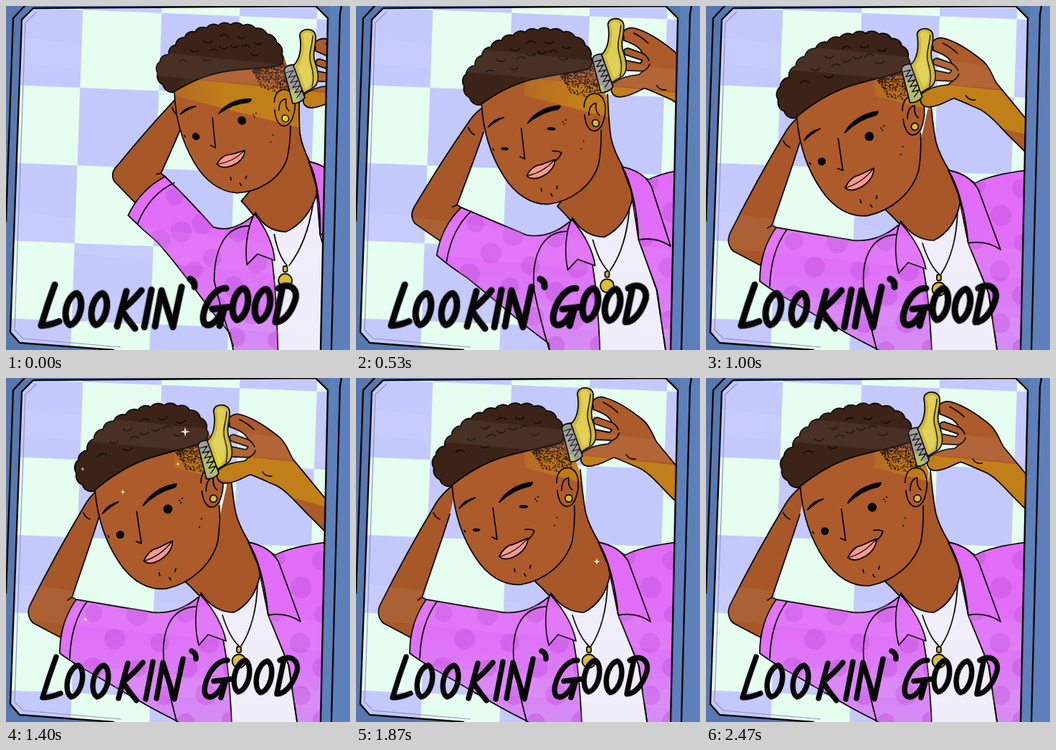
Recreate the animation shown at these times as an HTML page. Size 480x480 px, loop 2540 ms.

```html
<!DOCTYPE html>
<html lang="en">
<head>
<meta charset="utf-8">
<title>Lookin' Good</title>
<style>
html, body { margin: 0; width: 100%; height: 100%; overflow: hidden; background: #5b7db6; }
svg { display: block; width: 100vw; height: 100vh; }
.ink, .line { stroke: #0b0706; stroke-width: 1.8; stroke-linecap: round; stroke-linejoin: round; }
.ink { fill: none; }
.thin { stroke-width: 1.3; }
.skin { fill: #ad5b2a; }
.shade { fill: #a75728; }
.cloth { fill: url(#cloth); }
#sheen { mix-blend-mode: overlay; }
</style>
</head>
<body>
<svg viewBox="0 0 480 480" role="img" aria-label="Lookin' good">
  <defs>
    <linearGradient id="cloth" gradientUnits="userSpaceOnUse" x1="0" y1="230" x2="0" y2="480">
      <stop offset="0" stop-color="#e26cf8"/><stop offset=".5" stop-color="#e06ff7"/><stop offset="1" stop-color="#d58df5"/>
    </linearGradient>
    <linearGradient id="gold">
      <stop offset="0" stop-color="#bee614" stop-opacity=".2"/><stop offset=".3" stop-color="#bee614" stop-opacity=".5"/>
    </linearGradient>
    <clipPath id="glass"><path d="M38 3L432 0L449 17L439 480H150L19 470L6 455L22 19Z"/></clipPath>
    <clipPath id="shirtClip"><use href="#shirtL"/><use href="#shirtR"/></clipPath>
    <clipPath id="skinClip"><use href="#face" id="faceClip"/><use href="#neck"/><use href="#hand" id="handClip"/></clipPath>
  </defs>

  <g clip-path="url(#glass)">
    <rect width="480" height="480" fill="#e5feef"/>
    <path id="tiles" fill="#c4c9fd"/>

    <path class="warp shade line" d="M140 150L131 153Q120 162 112 174Q70 244 33 318Q28 332 38 342L76 362L98 309L92 306Q119 228 131 190"/>
    <path class="warp ink" d="M108 188Q111 195 117 197M92 306L86 310"/>
    <path id="neck" class="warp shade line" d="M313 128Q317 172 321 190Q326 208 339 229L357 258L356 302L318 334L288 326Q268 300 250 284L290 230"/>
    <path class="warp line" fill="#f0edfb" d="M272 300Q290 327 318 327Q348 312 355 272Q361 300 366 331L394 400L412 520L316 520L303 372Z"/>
    <path id="shirtL" class="warp cloth line" d="M98 309Q150 318 205 327Q240 330 268 306L303 365Q314 420 316 520L244 520L241 480Q205 462 185 450Q150 430 118 411Q95 399 75 384Q75 341 98 309Z"/>
    <path id="shirtR" class="warp cloth line" d="M338 229L376 247Q400 234 460 228L520 520L412 520L395 402L366 331L352 262Z"/>
    <g id="spots" fill="#c556e0" opacity=".5" clip-path="url(#shirtClip)"></g>
    <path class="warp ink" d="M266 319C228 320 215 356 221 402Q228 445 244 500M113 312C98 332 90 358 89 391"/>
    <path class="warp ink" d="M302 331Q312 362 325 374M351 287Q349 342 328 374"/>
    <path class="warp cloth line" d="M271 302C263 320 263 350 269 373L282 358L307 367C302 343 289 322 271 302Z"/>
    <path class="warp cloth line" d="M338 229Q368 235 380 256L411 340Q390 326 366 331C362 290 352 250 338 229Z"/>
    <g id="pendant" class="line" fill="#cfb52e">
      <rect x="-3" y="-20" width="6" height="8" rx="2"/>
      <circle r="9.5"/><circle r="6.5" fill="#d8c13a" stroke="none"/>
    </g>

    <g id="head">
      <path id="face" class="skin" d="M135 152C138 190 150 225 168 252C185 278 208 291 232 289C265 283 294 259 303 228L306 178L314 132L292 75L240 85L150 125Z"/>
      <path class="ink" d="M135 152C138 190 150 225 168 252C185 278 208 291 232 289C265 283 294 259 303 228Q307 205 306 178"/>
      <path id="fade" fill="none" stroke="#25120a" stroke-width="1.4"/>
      <path id="hair" class="line" fill="#3c2317"/>
      <path id="curls" class="ink thin"/>
      <path class="skin line" d="M281 146C281 129 291 123 301 126C313 131 313 150 309 164C306 175 300 181 293 179C285 176 283 166 282 157"/>
      <path class="ink" d="M288 157C288 146 292 140 298 139C297 147 299 153 303 156"/>
      <circle cx="298" cy="168" r="5" class="line" fill="#d8b92c"/>
      <path d="M145 183Q152 171 167 168Q155 174 145 183Z" class="line"/>
      <path d="M201 174C209 160 226 148 247 146Q247 149 244 151C226 155 213 163 201 174Z" class="line"/>
      <ellipse id="eyeL" cx="169" cy="213" rx="5.5"/>
      <ellipse id="eyeR" cx="235" cy="180" rx="6.3"/>
      <path class="ink" d="M192 182L198 226L191 223"/>
      <path class="line" fill="#f79a92" d="M201 250C206 240 213 234 220 233C226 231 233 227 241 224C241 235 233 244 224 249C215 254 207 255 201 250Z"/>
      <path class="ink thin" d="M202 250Q224 244 240 225"/>
      <path id="smile" class="ink" d="M237 212Q247 211 250 214Q247 222 240 227"/>
      <path class="ink" d="M251 169h.5M255 166h.5M253 172h.5M152 214l1.5 2M281 195h.5M278 206h.5M222 267l1 4M236 274l2 3M245 262l-1 4"/>
    </g>

    <g id="grip">
      <path id="hand" class="skin line" d="M331 49C327 39 339 34 349 38C366 43 385 56 401 69C412 79 414 91 420 100L490 185V226L445 181C428 165 412 144 396 136C384 131 372 125 360 121C351 124 341 132 326 133C314 133 311 124 316 114C325 107 338 103 352 102L358 97L334 96Q327 88 334 82L354 86L357 82L333 74Q328 66 337 65L357 72C354 64 347 60 331 54Z"/>
      <path class="ink" d="M357 72Q363 75 366 82M358 97Q366 93 367 87M345 44Q357 50 365 58M377 117Q381 124 390 123"/>
      <path class="line" fill="#9a9a9c" d="M287 80Q289 73 301 73L316 119Q310 127 299 127Z"/>
      <path id="bristles" class="ink thin"/>
      <path class="line" fill="#cbb73a" d="M309 33C308 21 330 20 331 33C332 48 325 57 331 72C337 90 336 101 326 106L314 113L300 74C309 66 312 50 309 33Z"/>
      <path fill="#e0cf52" d="M313 32C314 26 325 26 326 33C325 48 318 60 323 75Q327 90 323 102L317 106L306 76C314 66 317 48 313 32Z"/>
      <path class="ink thin" d="M327 33C326 50 320 58 325 74Q330 90 326 104"/>
    </g>

    <path id="sheen" d="M235 100L480 125V188L235 125Z" fill="url(#gold)" clip-path="url(#skinClip)"/>
    <g fill="#fff" opacity=".06">
      <path d="M0 42L480 92V122L0 78Z"/><path d="M0 285L480 345V385L0 335Z"/><path d="M0 390L480 440V465L0 425Z"/>
    </g>
    <path id="stars" fill="#fffef4"/>
    <path d="M43 8L27 23L12 452L24 464L160 476" fill="none" stroke="#8f94c8" stroke-width="1.2"/>
  </g>

  <path fill="#5878b0" fill-rule="evenodd" d="M0 0H480V480H0ZM38 3L432 0L449 17L439 480H150L19 470L6 455L22 19Z"/>
  <path fill="#5d80bb" d="M452 0H480V480H441Z"/>
  <path class="ink" style="stroke-width:2.4" d="M432 0L449 17L439 480M150 480L19 470L6 455L22 19L38 3L432 0M468 0L466 12L454 480M26 0L10 17L0 300"/>

  <g id="lettering" fill="none" stroke="#060505" stroke-linecap="round" stroke-linejoin="round">
    <path id="soft" opacity=".35"/><path id="letters"/>
  </g>
</svg>
<script>
const $ = id => document.getElementById(id);
const set = (id, name, value) => $(id).setAttribute(name, value);
const LOOP = 2540, FPS = 15, SLIDE = 14, LAST = 37;

const clamp = v => Math.max(0, Math.min(1, v));
const mix = (a, b, p) => a + (b - a) * p;
const smooth = v => { v = clamp(v); return v * v * (3 - 2 * v); };

let seed = 7;
const rnd = () => (seed = seed * 16807 % 2147483647) / 2147483647;

// Moves a resting body point back towards the start pose; the raised arm swings more than the torso.
function warp(x, y, k) {
  const w = smooth((260 - x + .4 * Math.max(0, y - 384)) / 160);
  const low = Math.min(75, Math.max(0, y - 309));
  const dx = mix(64 + .12 * Math.max(0, 400 - y), 124 - .03 * (x - 98) - .39 * low, w);
  const dy = mix(-12, -71 + .35 * (x - 98) - .17 * (y - 309), w);
  return [x + dx * k, y + dy * k];
}

// Brush stroke height: two strokes as [step, height].
const strokes = [[0, 0], [8, .75], [20, 0], [28, 1], [38, .75]];
function liftAt(step) {
  const n = strokes.findIndex(s => s[0] > step);
  const [a, from] = strokes[n - 1], [b, to] = strokes[n];
  return mix(from, to, smooth((step - a) / (b - a)));
}

function buildTiles() {
  const corner = (c, r) => {
    const y = 1 + 108.5 * r + 4.4 * c;
    return `${-3.5 + 111.5 * c - .5 * c * c - y * .036} ${y}`;
  };
  let d = "";
  for (let r = -1; r < 5; r++) for (let c = 0; c < 5; c++)
    if ((r + c) % 2 === 0) d += `M${corner(c, r)}L${corner(c + 1, r)}L${corner(c + 1, r + 1)}L${corner(c, r + 1)}Z`;
  set("tiles", "d", d);
}

function buildHair() {
  const rim = $("hair"), bumps = 16;
  rim.setAttribute("d", "M133 152C100 140 105 105 125 96C140 60 190 38 232 38C272 38 300 66 286 90");
  const length = rim.getTotalLength(), r = length / bumps * .72;
  const at = f => rim.getPointAtLength(length * f);
  let d = "M133 152", curls = "", dots = "";
  for (let i = 1; i <= bumps; i++) {
    const p = at(i / bumps);
    d += `A${r} ${r} 0 0 1 ${p.x} ${p.y}`;
    if (i < 3 || i > 14) continue;
    const pull = i % 2 ? .3 : .55;
    curls += `M${mix(p.x, 225, pull) - 6} ${mix(p.y, 95, pull)}a7 6 0 0 ${i % 3 ? 0 : 1} 12 -1`;
  }
  set("hair", "d", d + "C268 97 238 101 205 111C175 121 150 138 133 152Z");
  set("curls", "d", curls);

  for (let i = 0; i < 520; i++) {
    const u = rnd(), v = rnd() ** 1.6;
    dots += `M${246 + 46 * u + v * 16} ${103 - 17 * u + v * (26 + 22 * u)}h1.4`;
  }
  set("fade", "d", dots);
}

function buildBristles() {
  let d = "M290 84";
  for (let i = 0; i < 5; i++) d += "l10 -3l-7 10";
  set("bristles", "d", d);
}

function buildSpots() {
  const list = [];
  for (let r = 0; r < 7; r++) for (let c = 0; c < 6; c++) {
    const dot = document.createElementNS("http://www.w3.org/2000/svg", "circle");
    dot.setAttribute("r", 12 + 3 * rnd());
    list.push({ dot, x: 118 + 64 * c + 32 * (r % 2) + 8 * rnd(), y: 250 + 38 * r + 6 * rnd() });
    $("spots").appendChild(dot);
  }
  return list;
}

function buildLetters() {
  const o = (x, y) => `M${x + 5} ${y - 22}A12.5 23 13 0 0 ${x - 5} ${y + 22}A12.5 23 13 0 0 ${x + 5} ${y - 22}`;
  const d = "M70 389Q60 416 51 446Q62 446 76 440" + o(96, 423) + o(132, 423) +
    "M170 398L157 447M191 397Q176 415 163 424Q172 438 182 450M205 396L195 448M210 447L219 397L235 448L247 392" +
    "M259 381Q266 384 265 392M309 394C290 392 271 430 279 443C287 450 299 438 304 424M290 423L315 420M307 421L300 446" +
    o(329, 416) + o(360, 417) + "M388 392L378 440M382 394C398 384 411 396 405 412C399 430 388 441 378 441";
  set("letters", "d", d);
  set("soft", "d", d);
}

const glints = [[250, 75, 7], [163, 159, 4], [111, 337, 4], [240, 120, 3], [107, 127, 3]];
function star(x, y, size, age) {
  const s = size * Math.max(0, 1 - (age / 270) ** 2);
  if (!s) return "";
  let d = "";
  for (let i = 0; i < 8; i++) {
    const r = i % 2 ? s * .25 : s, a = i * Math.PI / 4;
    d += `${i ? "L" : "M"}${x + r * Math.cos(a)} ${y + r * Math.sin(a)}`;
  }
  return d + "Z";
}

function draw(time) {
  const step = Math.min(LAST, Math.floor((time % LOOP + 4) * FPS / 1000));
  const now = step * 1000 / FPS;
  const p = smooth(step / SLIDE), k = 1 - p, lift = liftAt(step);

  for (const { el, d } of body) el.setAttribute("d", d.replace(/([\d.]+) ([\d.]+)/g,
    (_, x, y) => warp(+x, +y, k).map(v => v.toFixed(1)).join(" ")));
  for (const { dot, x, y } of spots) {
    const [cx, cy] = warp(x, y, k);
    dot.setAttribute("cx", cx);
    dot.setAttribute("cy", cy);
  }
  set("pendant", "transform", `translate(${warp(325, 395, k)})`);

  const x = mix(268, 162, p) - 3 + 9 * lift, y = mix(182, 219, p) - 7 * lift;
  const tilt = mix(1, -.28, p) + .33 * lift;
  const head = `translate(${x} ${y}) matrix(${1 - .047 * tilt} ${.13 * tilt} ${-.039 * tilt} ${1 - .07 * tilt} 0 0) translate(-169 -213)`;
  const grip = `translate(${mix(101, -20, p) + 20 * lift} ${mix(9, 15, p) - 25 * lift})`;
  set("head", "transform", head);
  set("faceClip", "transform", head);
  set("grip", "transform", grip);
  set("handClip", "transform", grip);

  const blink = clamp(1 - Math.min(Math.abs(step - 8), Math.abs(step - 28)) / 2);
  set("eyeL", "ry", mix(5.5, 2.2, blink));
  set("eyeR", "ry", mix(6.3, 2.4, blink));
  set("smile", "visibility", lift > .5 ? "visible" : "hidden");

  set("stars", "d", glints.map(g => star(...g, now - 1400)).join("") + star(336, 256, 5, now - 1870));

  const thin = (step + 6) % 8 < 4;
  set("letters", "stroke-width", thin ? 7 : 8.4);
  set("soft", "stroke-width", thin ? 8 : 10.5);
  set("lettering", "transform", thin ? "" : "translate(-2 0)");
}

buildTiles();
buildHair();
buildBristles();
buildLetters();
const spots = buildSpots();
const body = [...document.querySelectorAll(".warp")].map(el => ({ el, d: el.getAttribute("d") }));

const start = performance.now();
function tick() {
  draw(performance.now() - start);
  requestAnimationFrame(tick);
}
tick();
</script>
</body>
</html>
```
